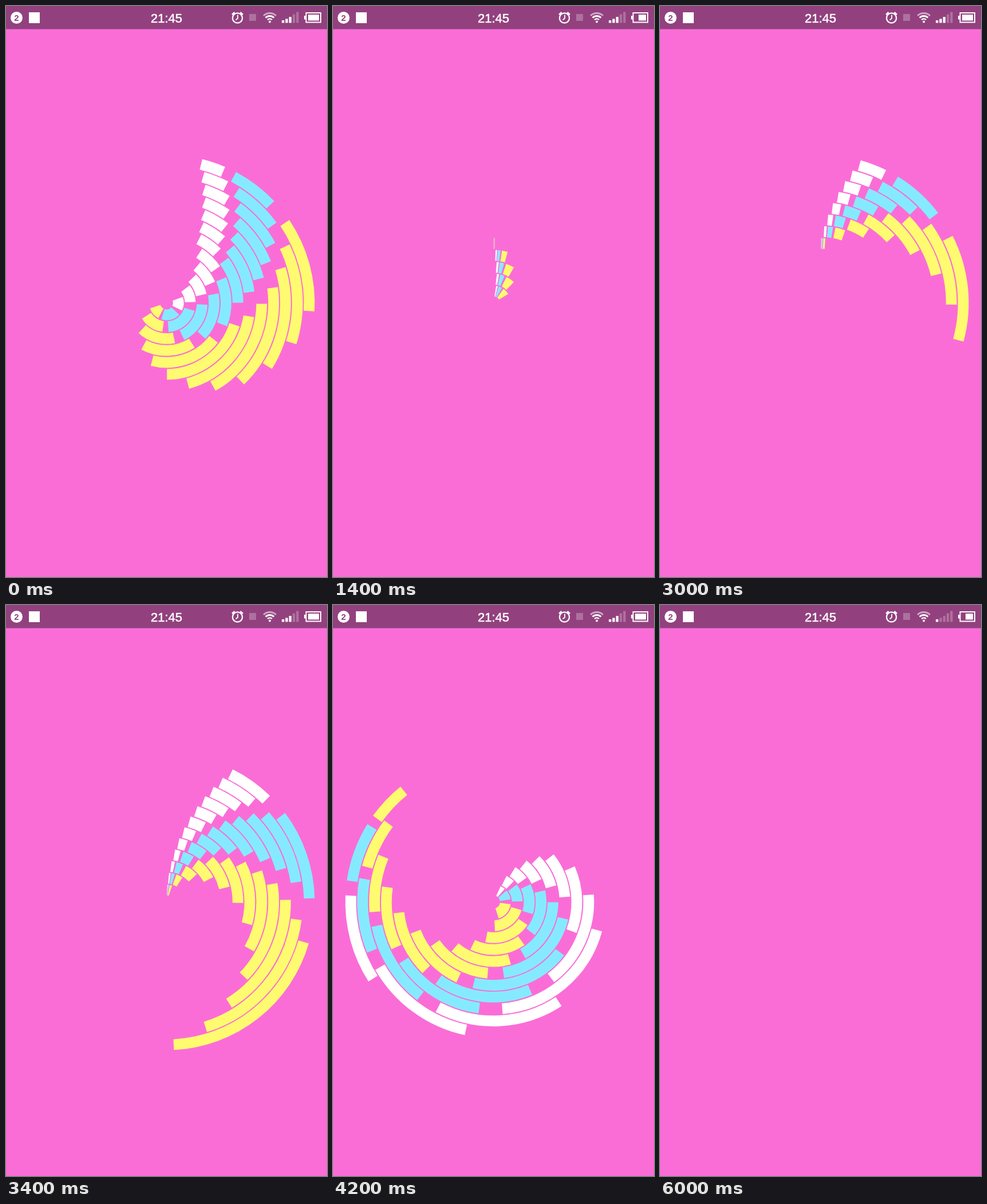
Write an HTML page with a canvas that moves like this. It is 561 px wide and 998 px high and loops after 6.1 s.

```html
<!DOCTYPE html>
<html lang="en">
<head>
<meta charset="utf-8">
<title>Ring wave loader</title>
<style>
html, body { margin: 0; width: 100%; height: 100%; overflow: hidden; background: #fa6dd7; }
canvas { display: block; width: 561px; height: 998px; }
</style>
</head>
<body>
<canvas id="stage" width="561" height="998"></canvas>
<script>
const ctx = document.getElementById('stage').getContext('2d');
const W = 561, H = 998, CX = 280.5, CY = 519;
const LOOP = 6100, STEP = 100;
const RINGS = 12, PITCH = 20.8, THICK = 18.8;
const SWEEP = 2000, STAGGER = 0.04, FORWARD_START = 2416;
const PINK = '#fa6dd7', BAR = '#92417e', WHITE = '#fff', BLUE = '#86eaff', YELLOW = '#fffb70';

// Progress of the outermost ring while the wave runs back, as [time, progress].
const BACK = [[0, 0.259], [200, 0.182], [300, 0.182], [600, 0.067], [1400, -0.277], [2400, -0.7]];

// Two straight pieces through (0, 0), (0.5, mid) and (1, 1).
const bend = (p, mid) => p < 0.5 ? 2 * mid * p : mid + (1 - mid) * (2 * p - 1);
const head = p => bend(p, 0.25);
const tail = p => bend(p, 0.3);

function along(points, t) {
  for (let i = 1; i < points.length; i++) {
    const [t0, v0] = points[i - 1], [t1, v1] = points[i];
    if (t <= t1) return v0 + (v1 - v0) * (t - t0) / (t1 - t0);
  }
  return points[points.length - 1][1];
}

function arc(radius, from, to, color) {
  const turn = v => v * Math.PI * 2 - Math.PI / 2;
  ctx.strokeStyle = color;
  ctx.lineWidth = THICK;
  ctx.beginPath();
  ctx.arc(CX, CY, radius, turn(from), turn(to));
  ctx.stroke();
}

function drawRings(t) {
  const back = t < FORWARD_START;
  const lead = back ? along(BACK, t) : (t - FORWARD_START) / SWEEP;
  for (let i = 0; i < RINGS; i++) {
    const lag = (RINGS - 1 - i) * STAGGER;
    let p = back ? lead + lag : lead - lag;
    if (p <= 0 || p >= 1) continue;
    // Each colour trails the one before it.
    for (const color of [YELLOW, BLUE, WHITE]) {
      arc(PITCH * (i + 1), tail(p), p, color);
      p = head(p);
    }
  }
}

function rect(x, y, w, h, alpha = 1) {
  ctx.globalAlpha = alpha;
  ctx.fillRect(x, y, w, h);
  ctx.globalAlpha = 1;
}

function line(width, ...pts) {
  ctx.lineWidth = width;
  ctx.beginPath();
  pts.forEach(([x, y]) => ctx.lineTo(x, y));
  ctx.stroke();
}

function ringArc(x, y, r, a0, a1, width) {
  ctx.lineWidth = width;
  ctx.beginPath();
  ctx.arc(x, y, r, a0, a1);
  ctx.stroke();
}

function disc(x, y, r) {
  ctx.beginPath();
  ctx.arc(x, y, r, 0, Math.PI * 2);
  ctx.fill();
}

function drawAlarm() {
  ringArc(404.5, 21, 8.6, 0, Math.PI * 2, 2.3);
  line(1.8, [405, 15.5], [405, 21.5], [401.5, 24.5]);
  line(2.4, [395, 15], [399.5, 11]);
  line(2.4, [414, 15], [409.5, 11]);
}

function drawWifi() {
  const up = -Math.PI / 2, half = 0.78;
  ctx.globalAlpha = 0.55;
  ringArc(461, 28, 15.5, up - half, up + half, 2.8);
  ctx.globalAlpha = 1;
  ringArc(461, 28, 10.5, up - half, up + half, 2.8);
  ringArc(461, 28, 5.5, up - half, up + half, 2.6);
  disc(461, 27.5, 2);
}

function drawStatus(t) {
  ctx.fillStyle = BAR;
  ctx.fillRect(0, 0, W, 40.5);

  ctx.fillStyle = ctx.strokeStyle = WHITE;
  disc(18.5, 20.5, 10.5);
  rect(40, 11, 19, 19);
  ctx.textAlign = 'center';
  ctx.font = '22px "Liberation Sans", Arial, sans-serif';
  ctx.fillText('21:45', CX, 28.5);
  ctx.lineWidth = 0.6;
  ctx.strokeText('21:45', CX, 28.5);
  ctx.fillStyle = BAR;
  ctx.font = 'bold 15px "Liberation Sans", Arial, sans-serif';
  ctx.fillText('2', 18.5, 25.8);

  ctx.fillStyle = WHITE;
  drawAlarm();
  rect(425, 14, 12, 12, 0.25);
  drawWifi();

  const lit = t < 5300 ? 3 : 1;
  [4.5, 7, 10.5, 15, 19].forEach((h, i) =>
    rect(482 + i * 6.3, 29.5 - h, 4.3, h, i < lit ? 1 : 0.25));

  ctx.lineWidth = 2;
  ctx.strokeRect(524.5, 12, 25.5, 16.5);
  rect(521, 17, 3, 6.5);
  const phase = t % 2400;
  const fill = phase >= 1200 && phase < 1800 ? 13 : 19;
  rect(547 - fill, 15, fill, 10.5);
}

function draw(now) {
  const t = Math.floor(now % LOOP / STEP) * STEP;
  ctx.fillStyle = PINK;
  ctx.fillRect(0, 0, W, H);
  drawRings(t);
  drawStatus(t);
}

const start = performance.now();
function tick() {
  draw(performance.now() - start);
  requestAnimationFrame(tick);
}
tick();
</script>
</body>
</html>
```
